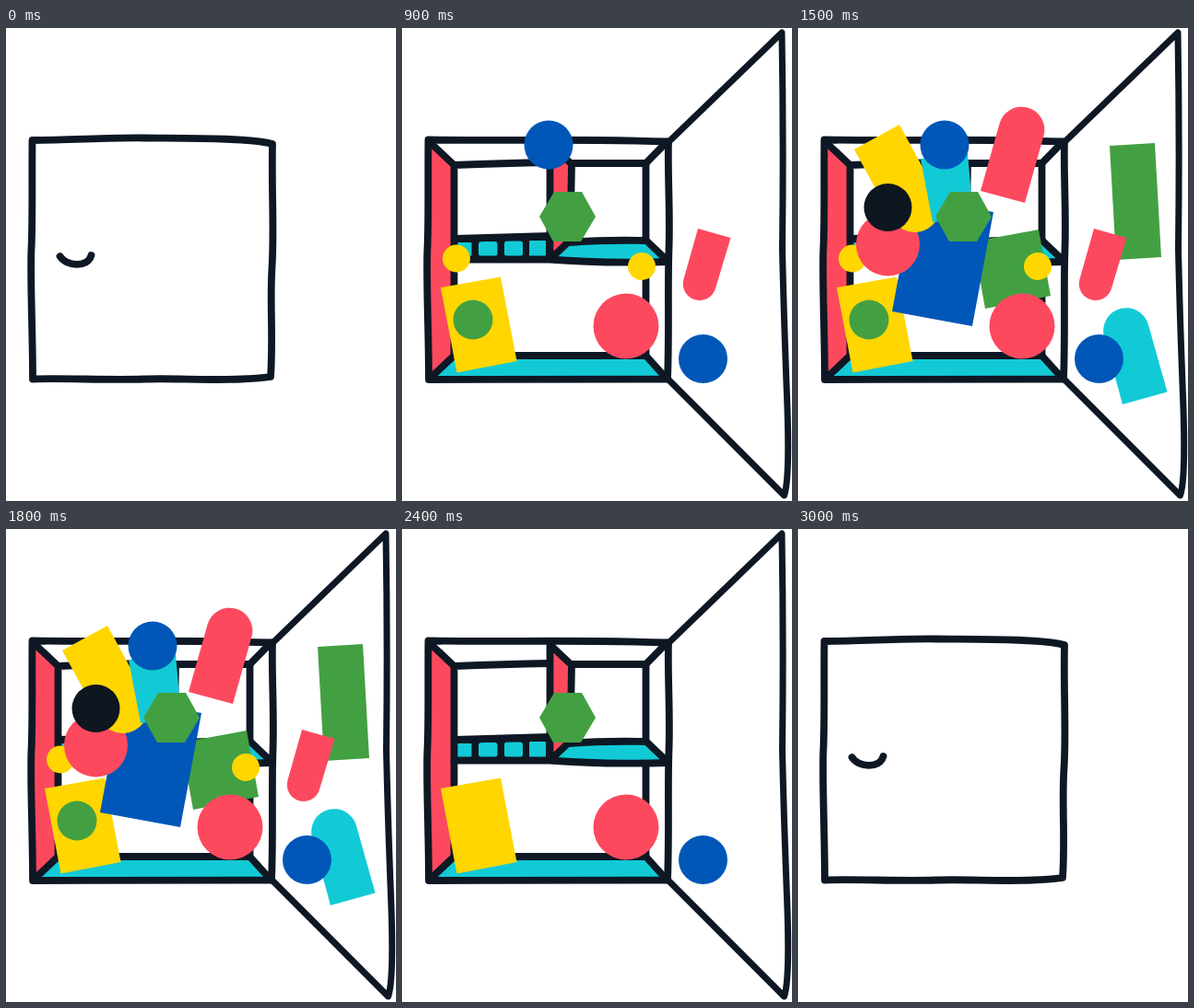
An HTML page that plays this animation: 423x514 px, repeating every 3.3 s.

```html
<!DOCTYPE html>
<html lang="en">
<head>
<meta charset="utf-8">
<title>Toy cupboard</title>
<style>
  html, body { margin: 0; width: 100%; height: 100%; overflow: hidden; background: #fff; }
  svg { display: block; width: 423px; height: 514px; }

  .ink { fill: none; stroke: #0e1824; stroke-width: 7.8; stroke-linecap: round; stroke-linejoin: round; }
  .black { fill: #0e1620; }
  .red { fill: #fd495e; }
  .cyan { fill: #12cad6; }
  .yellow { fill: #ffd600; }
  .green { fill: #43a042; }
  .blue { fill: #0057b8; }

  /* Eleven equal beats of 300 ms: fill up, then empty again */
  .closed, .open, .first, .more, .full { animation: 3.3s step-end infinite; }
  .closed { animation-name: closed; }
  .open { animation-name: open; }
  .first { animation-name: first; }
  .more { animation-name: more; }
  .full { animation-name: full; }

  @keyframes closed { 0%, 90.9091% { visibility: visible } 9.0909% { visibility: hidden } }
  @keyframes open { 0%, 90.9091% { visibility: hidden } 9.0909% { visibility: visible } }
  @keyframes first { 0%, 81.8182% { visibility: hidden } 18.1818% { visibility: visible } }
  @keyframes more { 0%, 72.7273% { visibility: hidden } 27.2727% { visibility: visible } }
  @keyframes full { 0%, 63.6364% { visibility: hidden } 36.3636% { visibility: visible } }
</style>
</head>
<body>
<svg viewBox="0 0 423 514">
  <g class="closed ink" stroke-width="7.500">
    <path d="M28.500 122C70 122 110 119 150 119.500S265 119 289 126C288 180 291 220 288.500 260S290 335 287 379C240 385 190 380 150 381.500S60 380 29 381.500C29 330 26 270 27.500 240S28 160 28.500 122Z"/>
    <path d="M58.500 248C65 259 89 261 92.500 247"/>
  </g>

  <g class="open">
    <path class="red" d="M30 124L56 149V356L30 379Z"/>
    <path class="cyan" d="M33 381L56 357H265L285 381Z"/>
    <path class="red" d="M161 126L183 147L181 232L161 249Z"/>
    <path class="cyan" d="M164 252L182 233L265 231L286 253Z"/>
    <path class="black" d="M57 229L160 226V252H57Z"/>
    <g class="cyan">
      <rect x="60" y="233" width="15.500" height="15" rx="1"/>
      <rect x="83" y="232" width="20.500" height="16" rx="3"/>
      <rect x="111" y="231.500" width="20" height="16.500" rx="3"/>
      <rect x="138" y="231" width="18" height="17" rx="1"/>
    </g>
    <g class="ink">
      <path d="M28.500 121.500C110 123 190 120 289 123.500C288 160 291 200 289.500 240S290 330 288 381.500C220 381 120 382 29 382C29 330 26 270 27.500 240S28 160 28.500 121.500Z"/>
      <path d="M29 123L56.500 149Q110 147 160 146M184 147H264.500V231M56.500 149V356H264.500V258"/>
      <path d="M287 124L264.500 147M30 381L56.500 356M287 381L264.500 356"/>
      <path d="M160.500 123V250M161 126L184 148Q184 190 181 232L162 250"/>
      <path d="M57 229L160 226M56.500 251.500H160Q215 256 288 254M181 233Q220 230 265 231L287 252"/>
      <path stroke-width="7" d="M290 123L412 5Q414 120 412.500 240Q414 310 417.500 400T414.500 508L289 382"/>
    </g>
  </g>

  <path class="first yellow" d="M42 282L107 270.500L124.500 362L59.500 374.500Z"/>
  <g class="more">
    <circle class="yellow" cx="59" cy="250.500" r="15"/>
    <circle class="green" cx="77" cy="317" r="21.500"/>
  </g>

  <g class="full">
    <path class="green" d="M190 232L261 219L274 291L203 305Z"/>
    <path class="blue" d="M125 184L212 200L189 324L102 308Z"/>
    <circle class="red" cx="97.500" cy="235" r="34.500"/>
    <path class="yellow" d="M61 132L110 105L151 180.500A27 27 0 0 1 102 207.500Z"/>
    <path class="cyan" d="M133 142L184 136L190 205L146 211Z"/>
    <circle class="black" cx="97.500" cy="195" r="26"/>
    <path class="red" d="M246 190L198 177L218.500 104A24 24 0 0 1 266.500 117Z"/>
    <path class="green" d="M338 128L387 125L394 249L345 252Z"/>
    <path class="cyan" d="M400.500 395.500L352 409L332 335.500A24 24 0 0 1 380 322.500Z"/>
  </g>

  <g class="first">
    <path class="green" d="M149 205L165 178H195L210 205L194 232H164Z"/>
    <circle class="red" cx="243" cy="324" r="35.500"/>
    <circle class="blue" cx="326.500" cy="359.500" r="26.500"/>
  </g>

  <g class="more">
    <circle class="blue" cx="159" cy="127" r="26.500"/>
    <circle class="yellow" cx="260" cy="259" r="15"/>
    <path class="red" d="M321 218L356.500 228L340 283A17 17 0 0 1 305.500 273Z"/>
  </g>
</svg>
</body>
</html>
```
